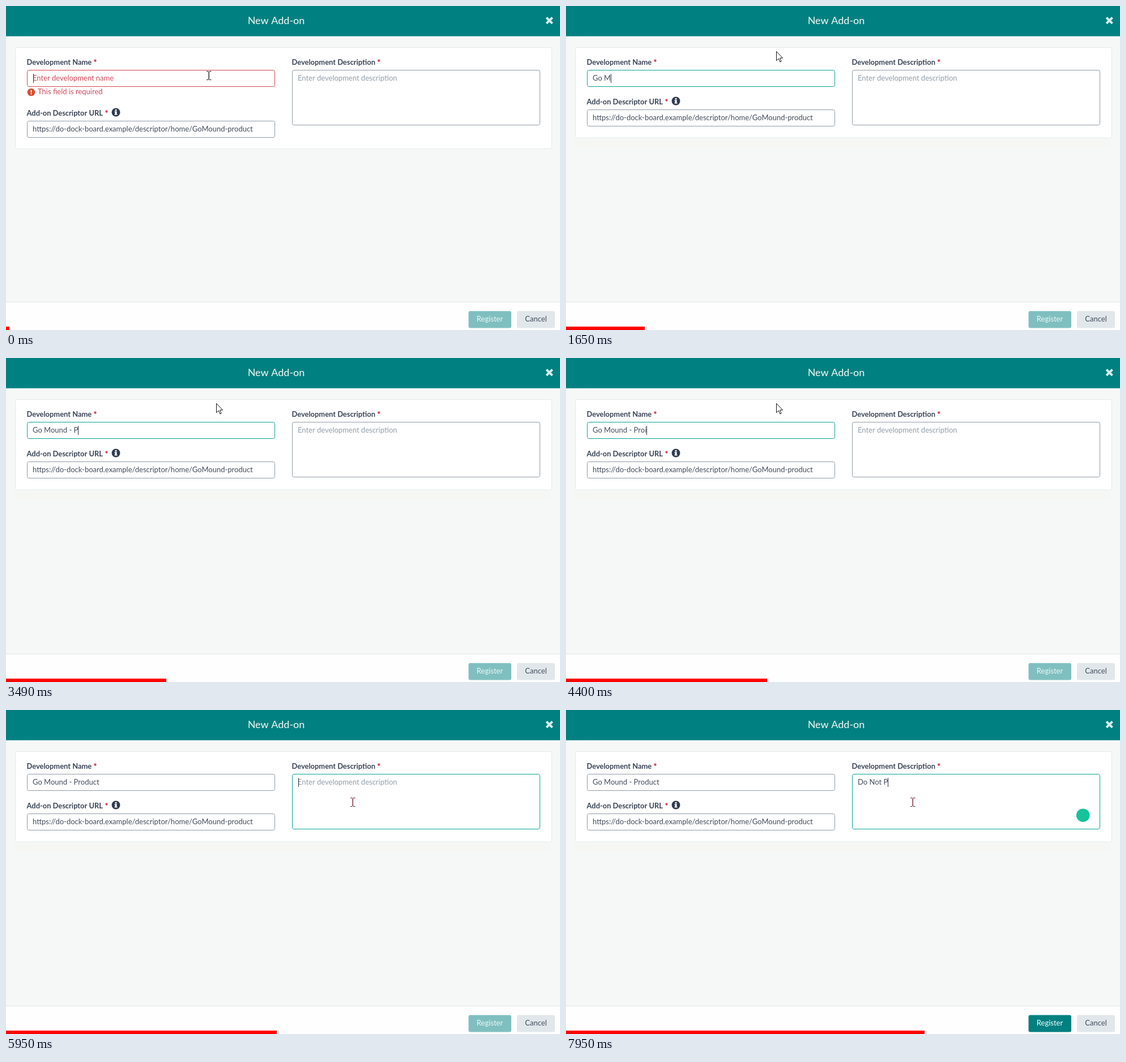
An HTML page with a canvas that plays this animation: 978x573 px, repeating every 8000 ms.

```html
<!DOCTYPE html>
<html lang="en">
<head>
<meta charset="utf-8">
<title>New Add-on</title>
<style>
  html, body { margin: 0; width: 100%; height: 100%; overflow: hidden; background: #f6f8f8; }
  canvas { display: block; }
</style>
</head>
<body>
<canvas id="stage" width="978" height="573"></canvas>
<script>
const ctx = document.getElementById('stage').getContext('2d');
const LOOP = 8000;
const FONT = 'Lato, Carlito, "Open Sans", sans-serif';
const BODY = '13px ' + FONT;
const BOLD = 'bold 12.9px ' + FONT;
const INK = '#434c5c', GREY = '#8e9ba8', TEAL = '#008080', FOCUS = '#08a29a', ALERT = '#d64550';
const URL_TEXT = 'https://do-dock-board.example/descriptor/home/GoMound-product';

// Keystrokes with their times; '<' deletes the last character.
const nameKeys = {
  keys: 'Go Mound - Proi<duct',
  times: [760, 1100, 1330, 1560, 1800, 1950, 2100, 2250, 2370, 2480,
          2720, 3140, 3630, 3910, 4390, 4550, 4700, 4850, 4990, 5130]
};
const noteKeys = {
  keys: 'Do Not P',
  times: [6370, 6620, 6850, 7050, 7200, 7350, 7500, 7760]
};
const FIRST_KEY = nameKeys.times[0];
const NOTE_KEY = noteKeys.times[0];
const CLICK = 5940;

// Screen refreshes come in groups of 12: first and last time of each group.
const groups = [[60, 820], [900, 1650], [1730, 2510], [2580, 3350], [3420, 4190],
                [4260, 5030], [5100, 5880], [5950, 6710], [6780, 7540], [7610, 8370]];

function refreshCount(t) {
  let n = 0;
  groups.forEach(([a, b], i) => {
    if (t >= a) n = i * 12 + 1 + Math.min(11, Math.floor((t - a + 4) / (b - a) * 11));
  });
  return n;
}

function typed({ keys, times }, t) {
  let text = '', last = 0;
  times.forEach((at, i) => {
    if (t < at) return;
    text = keys[i] === '<' ? text.slice(0, -1) : text + keys[i];
    last = at;
  });
  return { text, last };
}

function ease(t, a, b) {
  const p = Math.min(1, Math.max(0, (t - a) / (b - a)));
  return p * p * (3 - 2 * p);
}

function rect(x, y, w, h, color) {
  ctx.fillStyle = color;
  ctx.fillRect(x, y, w, h);
}

function box(x, y, w, h, r, fill, stroke) {
  ctx.beginPath();
  ctx.roundRect(x, y, w, h, r);
  ctx.fillStyle = fill;
  ctx.fill();
  if (!stroke) return;
  ctx.strokeStyle = stroke;
  ctx.lineWidth = 1;
  ctx.stroke();
}

function disc(x, y, r, color) {
  ctx.beginPath();
  ctx.arc(x, y, r, 0, Math.PI * 2);
  ctx.fillStyle = color;
  ctx.fill();
}

function write(text, x, y, color = INK, font = BODY, align = 'left') {
  ctx.font = font;
  ctx.textAlign = align;
  ctx.fillStyle = color;
  ctx.fillText(text, x, y);
}

function label(text, x, y) {
  write(text, x, y, '#3a4454', BOLD);
  const end = x + ctx.measureText(text + ' ').width;
  write('*', end, y + 1, '#cf1526', 'bold 15px ' + FONT);
}

function caret(text, x, y, idle) {
  if (idle % 1060 >= 530) return;
  ctx.font = BODY;
  rect(Math.floor(x + ctx.measureText(text).width), y, 1, 16, '#2c3340');
}

function cross(x, y, r) {
  ctx.beginPath();
  ctx.moveTo(x - r, y - r);
  ctx.lineTo(x + r, y + r);
  ctx.moveTo(x + r, y - r);
  ctx.lineTo(x - r, y + r);
  ctx.strokeStyle = '#d8eaea';
  ctx.lineWidth = 4;
  ctx.stroke();
}

function infoIcon(x, y) {
  disc(x, y, 7.5, '#2f3a4d');
  rect(x - 1.5, y - 5, 3, 2.4, '#fff');
  rect(x - 2.5, y - 1.5, 4, 1.5, '#fff');
  rect(x - 1.5, y - 1.5, 3, 5, '#fff');
  rect(x - 2.5, y + 3, 5, 1.5, '#fff');
}

function errorIcon(x, y) {
  disc(x, y, 6.8, '#da4a2d');
  rect(x - 1, y - 4, 2, 5, '#fff');
  rect(x - 1, y + 2, 2, 2, '#fff');
}

function arrow(x, y) {
  const pts = [[0, 0], [0, 16], [3.7, 12.6], [6.3, 18.4], [8.6, 17.4], [6, 11.7], [11, 11.5]];
  ctx.beginPath();
  pts.forEach(([dx, dy]) => ctx.lineTo(x + 0.5 + dx, y + 0.5 + dy));
  ctx.closePath();
  ctx.fillStyle = '#fff';
  ctx.fill();
  ctx.strokeStyle = '#111';
  ctx.lineWidth = 1;
  ctx.stroke();
}

function beam(x, y, color) {
  rect(x - 0.5, y - 7, 1.4, 14, color);
  for (const dy of [-8, 7]) {
    rect(x - 4, y + dy, 3.5, 1, color);
    rect(x + 1, y + dy, 3.5, 1, color);
  }
}

function pointer(t) {
  const up = ease(t, 80, 420), over = ease(t, 5230, 5800);
  const x = Math.round(358 + 13 * up + 241 * over);
  const y = Math.round(123 - 43 * up + 83 * over);
  const inName = x < 475 && y > 113 && y < 142;
  const inNote = x > 505 && y > 113;
  if (inName || inNote) beam(x, y, inNote ? '#7c1f2a' : '#1c1c1c');
  else arrow(x, y);
}

function leftColumn(t) {
  const { text, last } = typed(nameKeys, t);
  const invalid = t < FIRST_KEY;
  const active = t < CLICK;
  const shift = invalid ? 20 : 0;

  label('Development Name', 36.5, 104);
  box(37.5, 113.5, 437, 29, 3, '#fff', invalid ? ALERT : active ? FOCUS : GREY);
  if (invalid) {
    write('Enter development name', 47, 132, '#d04a5c');
    errorIcon(44.5, 152.5);
    write('This field is required', 56, 156, '#d04a5c');
  } else {
    write(text, 47, 132);
  }
  if (active) caret(text, invalid ? 48 : 47, 120, invalid ? 0 : t - last);

  label('Add-on Descriptor URL', 36.5, 174 + shift);
  infoIcon(194, 168 + shift);
  box(37.5, 183.5 + shift, 437, 29, 3, '#fff', GREY);
  write(URL_TEXT, 47, 202 + shift);
}

function rightColumn(t) {
  const { text, last } = typed(noteKeys, t);
  const active = t >= CLICK;
  label('Development Description', 504.5, 104);
  box(505.5, 113.5, 437, 97, 3, '#fff', active ? FOCUS : GREY);
  if (text) write(text, 515, 132);
  else write('Enter development description', 515, 132, '#919eaa');
  if (active) caret(text, text ? 515 : 516, 120, t - (last || CLICK));
  if (text) disc(912.7, 186.2, 11.8, '#15c39a');
}

function draw(t) {
  rect(0, 0, 978, 573, '#f6f8f8');
  rect(0, 0, 978, 53.5, TEAL);
  write('New Add-on', 477, 32, '#f4fafa', '18px ' + FONT, 'center');
  cross(959.3, 25.7, 5.2);

  const invalid = t < FIRST_KEY;
  if (!invalid) rect(16, 237, 946, 15, '#f6f6f4');
  box(16.5, 73.5, 947, invalid ? 179 : 160, 3, '#fff', '#e3e7e8');
  leftColumn(t);
  rightColumn(t);

  rect(0, 523, 978, 50, '#fefefe');
  rect(0, 523, 978, 1, '#e1e5e6');
  const ready = t >= NOTE_KEY;
  box(816.5, 539.5, 75.5, 30, 3, ready ? TEAL : '#80bfbf');
  write('Register', 854, 558, ready ? '#fff' : '#eef7f7', BODY, 'center');
  box(902, 539.5, 67, 30, 3, '#e1e7eb');
  write('Cancel', 935.5, 558, INK, BODY, 'center');

  pointer(t);
  rect(0, 567, Math.round(5.8 + 5.55 * refreshCount(t)), 6, '#fe0000');
}

const start = performance.now();
function tick() {
  draw((performance.now() - start) % LOOP);
  requestAnimationFrame(tick);
}
tick();
</script>
</body>
</html>
```
